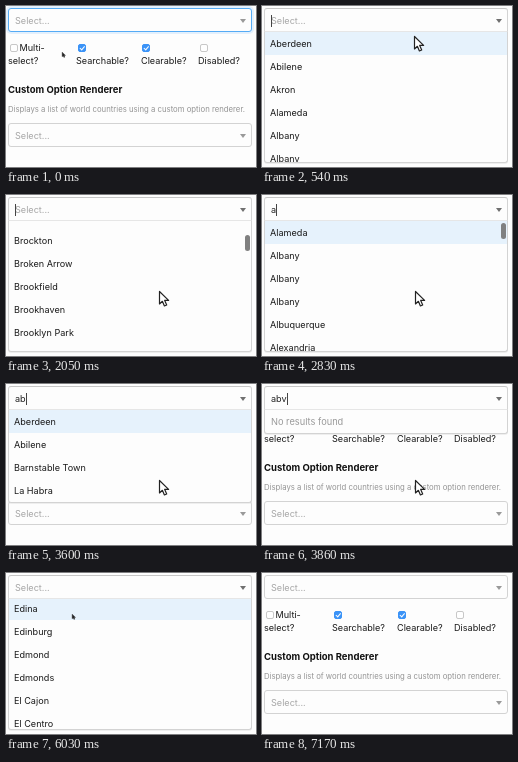
Recreate the animation shown at these times as an HTML page. Size 250 px wide and 161 px high, loop 7540 ms.

```html
<!DOCTYPE html>
<html lang="en">
<head>
<meta charset="utf-8">
<title>Select demo</title>
<style>
html, body { margin: 0; width: 100%; height: 100%; overflow: hidden; background: #fdfdfd; }
#stage { position: relative; width: 250px; height: 161px; overflow: hidden; font: 9.1px/13px Inter, "Open Sans", sans-serif; color: #1a1a1a; }
#stage div, #stage svg, .at { position: absolute; box-sizing: border-box; white-space: nowrap; }
#stage .select { left: 2px; width: 244px; height: 24px; border: 1px solid #d3d3d3; border-radius: 3px; background: #fdfdfd; }
#stage .select.focus { border-color: #55abf5; box-shadow: 0 0 0 2px rgba(0, 126, 255, .1); }
#stage .select.open { border-color: #c6c6c6 #d3d3d3 #e2e2e2; border-radius: 3px 3px 0 0; }
.hint { left: 6px; top: 5px; color: #a6a6a6; transform: translateY(-.5px); }
.arrow { right: 5.5px; top: 10px; border: solid transparent; border-width: 4px 3.7px 0; border-top-color: #999; }
.open .arrow { border-top-color: #707070; }
.typed { left: 6px; top: 5px; color: #222; }
.caret { top: 6px; width: 1px; height: 12px; background: #444; }
#stage .menu { left: 2px; top: 25px; width: 244px; border: 1px solid #d3d3d3; border-top-color: #e6e6e6; border-radius: 0 0 3px 3px; background: #fdfdfd; overflow: hidden; box-shadow: 0 1px 0 rgba(0, 0, 0, .06); }
.row { left: 0; width: 100%; height: 23px; padding-left: 5px; line-height: 24px; }
.row.on { background: #e6f2fc; }
.row.none { padding-left: 6px; font-size: 9.25px; color: #999; }
.thumb { right: 1px; width: 5px; height: 16px; border-radius: 3px; background: #808080; }
.box { width: 8px; height: 8px; border: 1px solid #c8c8c8; border-radius: 2px; background: #fff; }
.box.on { border-color: #3b93f7; background: #3b93f7; }
.box.on::after { content: ""; position: absolute; left: 2px; top: 0; width: 1.5px; height: 3.5px; border: solid #fff; border-width: 0 1px 1px 0; transform: rotate(40deg); }
h3 { margin: 0; left: 2px; top: 77px; font-size: 9.5px; font-weight: 700; color: #111; }
p { margin: 0; left: 2px; top: 97px; font-size: 7.76px; color: #949494; }
#cursor { left: 0; top: 0; overflow: visible; transform-origin: 0 0; }
</style>
</head>
<body>
<div id="stage">
  <div id="options"></div>
  <h3 class="at">Custom Option Renderer</h3>
  <p class="at">Displays a list of world countries using a custom option renderer.</p>
  <div class="select" style="top:117px"><div class="hint">Select...</div><div class="arrow"></div></div>
  <div class="select" id="control" style="top:2px">
    <div class="hint" id="hint">Select...</div>
    <div class="typed" id="typed"></div>
    <div class="caret" id="caret"></div>
    <div class="arrow"></div>
  </div>
  <div class="menu" id="menu"><div class="thumb" id="thumb"></div></div>
  <svg id="cursor" width="11" height="17">
    <path d="M.5 .5V13L3.4 10.3 5.4 15 7.7 14 5.7 9.4H9.6Z" stroke="#222" stroke-width="1.2" stroke-linejoin="round"/>
  </svg>
</div>
<script>
const LOOP = 7540, ROW = 23;
const split = s => s.split(',');
const $ = id => document.getElementById(id);

const early = split('Aberdeen,Abilene,Akron,Alameda,Albany,Albany,Albany,Albuquerque,Alexandria,Alexandria,Alhambra,Aliso Viejo,Allen,Allentown,Alpharetta,Altamonte Springs,Altoona,Amarillo,Ames,Anaheim,Anderson,Ankeny,Ann Arbor,Annapolis,Antioch,Apache Junction,Apex,Apopka,Apple Valley,Apple Valley,Appleton,Arcadia,Arlington,Arlington,Arlington Heights,Arvada,Asheville,Athens-Clarke County,Atlanta,Atlantic City,Attleboro,Auburn,Auburn,Augusta-Richmond County,Aurora,Aurora,Austin,Aventura,Avondale,Azusa,Bakersfield,Baldwin Park,Baltimore,Barnstable Town,Bartlett,Bartlett,Baton Rouge,Battle Creek,Bayonne,Baytown,Beaumont,Beaumont,Beavercreek,Beaverton,Bedford,Bell Gardens,Belleville,Bellevue,Bellevue,Bellflower,Bellingham,Beloit,Bend,Bentonville,Berkeley,Berwyn,Bethlehem,Beverly,Billings,Biloxi,Binghamton,Birmingham,Bismarck,Blacksburg,Blaine,Bloomington,Bloomington,Bloomington,Blue Springs,Boca Raton,Boise City,Bolingbrook,Bonita Springs,Bossier City,Boston,Boulder,Bountiful,Bowie,Bowling Green,Boynton Beach,Bozeman,Bradenton,Brea,Brentwood,Brentwood,Bridgeport,Bristol,Brockton,Broken Arrow,Brookfield,Brookhaven,Brooklyn Park,Broomfield,Brownsville');
const late = split('Denver,Des Moines,Des Plaines,Detroit,Diamond Bar,Doral,Dothan,Dover,Downers Grove,Downey,Draper,Dublin,Dubuque,Duluth,Duncanville,Dunwoody,Durham,Eagan,East Lansing,East Orange,East Providence,Eastvale,Eau Claire,Eden Prairie,Edina,Edinburg,Edmond,Edmonds,El Cajon,El Centro,El Monte,El Paso');
const LATE = 267;
const city = i => early[i] || late[i - LATE] || '';
const matches = split('Aberdeen,Abilene,Barnstable Town,La Habra');
const STOP = early.indexOf('Brockton');

// Each step changes part of the state; pos is the topmost row, fractional while scrolling.
const steps = [
  [0, { focus: 1, open: 0, text: '', caret: 0, pos: 0, hl: 0, thumb: 0, list: 'all', x: 56, y: 46, size: .36 }],
  [100, { x: 84, y: 34 }],
  [180, { x: 122, y: 19 }],
  [260, { x: 148, y: 8 }],
  [410, { open: 1, caret: 1, x: 150, y: 14 }],
  [540, { x: 152, y: 30, size: 1 }],
  [790, { hl: 3, caret: 0, x: 153, y: 96 }],
  [990, { hl: -1, caret: 1, pos: 7.4, thumb: 1 }],
  [1140, { pos: 20.15 }],
  [1270, { pos: 48.3 }],
  [1400, { pos: 75.6 }],
  [1530, { pos: 94.7 }],
  [1660, { pos: STOP - 3.6 }],
  [1790, { pos: STOP - .64 }],
  [1920, { pos: STOP - .46 }],
  [2050, { pos: STOP - .33 }],
  [2180, { pos: STOP - .28 }],
  [2310, { pos: STOP - .24 }],
  [2440, { pos: STOP - .21 }],
  [2570, { pos: STOP - .19 }],
  [2700, { text: 'a' }],
  [2830, { pos: 3, hl: 3 }],
  [3310, { hl: 6 }],
  [3600, { text: 'ab', list: 'some', pos: 0, hl: 0, thumb: 0 }],
  [3730, { text: 'abv', list: 'none', hl: -1 }],
  [4070, { text: '', list: 'all', hl: 0, thumb: 1 }],
  [4520, { pos: 60.3, hl: -1, caret: 0 }],
  [4730, { pos: 272.4, caret: 1 }],
  [4860, { pos: 290.24, hl: 293 }],
  [5350, { pos: 291.09, hl: 291, caret: 0, x: 77, y: 27.5 }],
  [5570, { y: 31 }],
  [5880, { caret: 1, thumb: .5, x: 66, y: 41, size: .36 }],
  [6030, { caret: 0, thumb: 0 }],
  [6390, { x: 64 }],
  [6550, { caret: 1 }],
  [6880, { size: 0 }],
  [7170, { open: 0, focus: 0, caret: 0 }]
];
let last = {};
const states = steps.map(([t, change]) => (last = { ...last, ...change, t }));

function add(parent, className, left, top, text = '') {
  const el = document.createElement('div');
  el.className = className;
  el.style.left = left + 'px';
  el.style.top = top + 'px';
  el.textContent = text;
  parent.append(el);
  return el;
}

[['select?', 2, 4, 0], ['Searchable?', 70, 72, 1], ['Clearable?', 135, 136, 1], ['Disabled?', 192, 194, 0]]
  .forEach(([name, x, boxX, on]) => {
    add($('options'), on ? 'box on' : 'box', boxX, 38);
    add($('options'), '', x, 48, name);
  });
add($('options'), '', 13.5, 35, 'Multi-');

const rows = Array.from({ length: 7 }, () => add($('menu'), 'row', 0, 0));
$('menu').append($('thumb'));

function drawRows(s) {
  const first = Math.floor(s.pos);
  const count = { all: 7, some: matches.length, none: 1 }[s.list];
  $('menu').style.height = (s.list === 'all' ? 132 : count * ROW + 2) + 'px';
  rows.forEach((row, n) => {
    const i = first + n;
    row.hidden = n >= count;
    row.textContent = s.list === 'all' ? city(i) : s.list === 'some' ? matches[n] || '' : 'No results found';
    row.className = 'row' + (s.list === 'none' ? ' none' : i === s.hl ? ' on' : '');
    row.style.top = (i - s.pos) * ROW + 'px';
  });
  $('thumb').style.top = 2 + s.pos * ROW * .005 + 'px';
  $('thumb').style.opacity = s.thumb;
}

function draw(s) {
  $('control').className = 'select' + (s.open ? ' open' : s.focus ? ' focus' : '');
  $('hint').hidden = s.text !== '';
  $('typed').textContent = s.text;
  $('caret').style.left = 6 + $('typed').offsetWidth + 'px';
  $('caret').style.opacity = s.caret;
  $('menu').style.display = s.open ? '' : 'none';
  drawRows(s);
  $('cursor').style.transform = `translate(${s.x}px, ${s.y}px) scale(${s.size})`;
  $('cursor').style.fill = s.size < 1 ? '#222' : '#fff';
}

const start = performance.now();
let shown;
function tick() {
  const t = (performance.now() - start) % LOOP;
  const s = states.filter(state => state.t <= t).pop() || states[0];
  if (s !== shown) draw(shown = s);
  requestAnimationFrame(tick);
}
tick();
</script>
</body>
</html>
```
